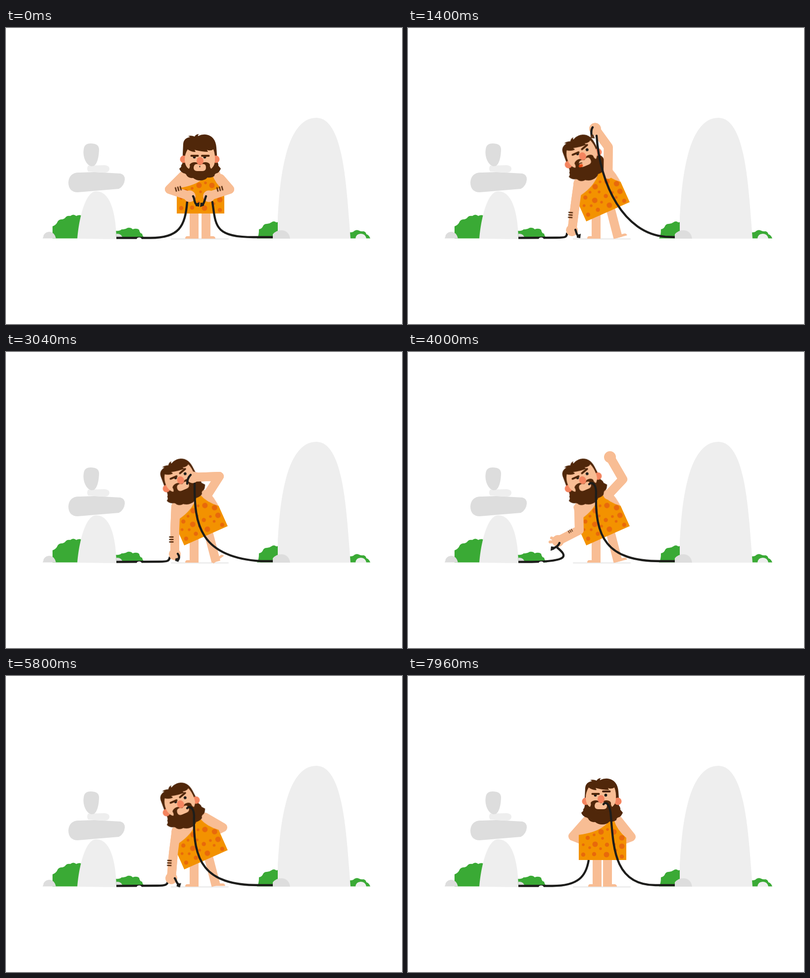
An HTML page without scripts that plays this animation: 800x600 px, repeating every 8 s.

```html
<!DOCTYPE html>
<html lang="en">
<head>
<meta charset="utf-8">
<title>Caveman</title>
<style>
html, body { margin: 0; width: 100%; height: 100%; overflow: hidden; background: #fff; }
svg { display: block; width: 100vw; height: 100vh; }
svg * { animation-duration: 8s; animation-iteration-count: infinite; animation-timing-function: ease-in-out; }
.pale { fill: #eee; }
.grey { fill: #ddd; }
.green { fill: #3aaa35; }
.skin { fill: #f8bd94; }
.red { fill: #f4845f; }
.hair { fill: #50270a; }
.ink { fill: #1d1d1b; }
.limb { fill: none; stroke: #f8bd94; stroke-width: 18; stroke-linecap: round; stroke-linejoin: round; }
.arm { marker-end: url(#hand); }
.cable { fill: none; stroke: #1d1d1b; stroke-width: 4.3; stroke-linecap: round; stroke-linejoin: round; }
.flat { stroke-linecap: butt; }
.brow { stroke: #50270a; stroke-width: 4; stroke-linecap: round; }
.band { fill: none; stroke: #50270a; stroke-width: 2.4; }
.spots { fill: none; stroke: #e8690b; stroke-linecap: round; }

/* Body */
.torso { transform-origin: 393px 373px; animation-name: torso; }
@keyframes torso {
  0%, 2% { transform: translate(0, 3px) rotate(0deg); }
  7%, 74% { transform: translate(11px, -.5px) rotate(-24deg); }
  80%, 100% { transform: translate(0, 0) rotate(0deg); }
}
.legL { animation-name: legL; }
@keyframes legL { 0%, 74% { transform: translate(-2px, 0); } 80%, 100% { transform: translate(0, 0); } }
.legR { transform-origin: 403px 370px; animation-name: legR; }
@keyframes legR {
  0%, 2% { transform: translate(1px, 0) rotate(0deg); }
  7%, 74% { transform: translate(7px, 0) rotate(-14.5deg); }
  80%, 100% { transform: translate(0, 0) rotate(0deg); }
}
.foot { transform-origin: 402px 425px; animation-name: foot; }
@keyframes foot {
  0%, 17% { transform: rotate(0deg); }
  22%, 41% { transform: rotate(-22deg); }
  47%, 51% { transform: rotate(0deg); }
  57%, 74% { transform: rotate(14.5deg); }
  80%, 100% { transform: rotate(0deg); }
}

/* Head */
.head { transform-origin: 392px 254px; animation-name: head; }
@keyframes head {
  0%, 2% { transform: translate(0, 8px) rotate(0deg); }
  7%, 74% { transform: translate(-37.5px, 10px) rotate(-23deg); }
  80%, 100% { transform: translate(0, 0) rotate(0deg); }
}
.ears { animation-name: ears; }
@keyframes ears { 0%, 2% { transform: translate(0, 4px); } 7%, 100% { transform: translate(0, 0); } }
.face { animation-name: face; }
@keyframes face { 0%, 2% { transform: translate(0, 12px); } 7%, 100% { transform: translate(0, 0); } }
.look { animation-name: look; }
@keyframes look { 0%, 92% { transform: translate(0, 0); } 95%, 100% { transform: translate(-2px, 0); } }
.pupils { animation-name: pupils; }
@keyframes pupils {
  0%, 2% { transform: translate(0, 0); }
  7%, 74% { transform: translate(4px, -.5px); }
  80%, 100% { transform: translate(0, 0); }
}
.raise { transform-origin: 403px 239px; animation-name: raise; }
@keyframes raise {
  0%, 2% { transform: translate(0, 0) rotate(0deg); }
  7%, 74% { transform: translate(0, -5px) rotate(-17deg); }
  80%, 92% { transform: translate(0, 0) rotate(0deg); }
  95%, 100% { transform: translate(0, -5px) rotate(0deg); }
}
.tongue { animation-name: tongue; }
@keyframes tongue { 0%, 4% { opacity: 0; } 7%, 17% { opacity: 1; } 20%, 100% { opacity: 0; } }
.lips { animation-name: lips; }
@keyframes lips { 0%, 2% { opacity: 1; } 4%, 100% { opacity: 0; } }

/* Arms */
.left { animation-name: left; }
@keyframes left {
  0%, 2% { d: path("M358 299L330 327L371 341"); }
  7%, 17% { d: path("M344 313L338 355L331 410"); }
  21.5%, 41% { d: path("M343 313L341 360L341 410"); }
  47%, 51% { d: path("M345 314L346 361L303 383"); }
  57%, 74% { d: path("M344 313L338 360L334 410"); }
  80%, 100% { d: path("M362 292L333 325L358 335"); }
}
.right { animation-name: right; }
@keyframes right {
  0%, 2% { d: path("M433 305L452 327L410 341"); }
  7%, 17% { d: path("M404 297L404 241L378 203"); }
  21.5%, 41% { d: path("M408 288L431 252L377 254"); }
  47% { d: path("M404 290L434 257L407 209"); }
  50% { d: path("M404 290L434 258L408 213"); }
  57%, 74% { d: path("M402 286L438 307L412 320"); }
  80%, 100% { d: path("M424 292L451 326L428 335"); }
}
.showL { animation-name: showL; animation-timing-function: step-end; }
@keyframes showL { 0% { opacity: 1; } 77%, 100% { opacity: 0; } }
.showR { animation-name: showR; animation-timing-function: step-end; }
@keyframes showR { 0% { opacity: 1; } 54%, 100% { opacity: 0; } }
.bandL { animation-name: bandL; }
@keyframes bandL {
  0%, 2% { transform: translate(348px, 326px) rotate(75deg) scale(1); }
  7%, 17% { transform: translate(328px, 379px) rotate(5deg) scale(1); }
  21.5%, 41% { transform: translate(334px, 380px) rotate(0deg) scale(1); }
  47%, 51% { transform: translate(328px, 363px) rotate(60deg) scale(.7); }
  57%, 100% { transform: translate(330px, 379px) rotate(3deg) scale(1); }
}
.bandR { animation-name: lips; }
.fingers { stroke-width: 6; animation-name: fingers; }
@keyframes fingers { 0%, 43% { opacity: 0; } 46%, 51% { opacity: 1; } 54%, 100% { opacity: 0; } }

/* Cables and clips */
.wireL { animation-name: wireL; }
@keyframes wireL {
  0%, 2% { d: path("M223 425.5L290 425.5C350 426 362 402 366 352"); }
  7%, 17% { d: path("M223 425.5L300 425C318 425 321 424 321 415"); }
  21.5%, 41% { d: path("M223 425.5L310 425C326 425 330 424 331 415"); }
  47%, 51% { d: path("M223 425.5L250 425.5C330 424 320 412 301 396"); }
  57%, 74% { d: path("M223 425.5L306 425C322 425 326 423 327 417"); }
  80%, 100% { d: path("M223 425.5L290 425.5C345 426 360 405 365 373"); }
}
.wireR { animation-name: wireR; }
@keyframes wireR {
  0%, 2% { d: path("M540 424L500 424C420 424 424 400 417 353C417 353 417 353 417 353"); }
  7%, 17% { d: path("M540 424L520 423C437 416 388 318 381 217C381 217 381 217 381 217"); }
  21.5%, 41% { d: path("M540 424L515 424C392 416 380 350 381 267C381 267 381 267 381 267"); }
  46%, 74% { d: path("M540 424L510 424C400 424 377 375 380 283C379 263 368 264 366 268"); }
  80%, 92% { d: path("M540 424L500 424C418 424 416 350 411 285C409 257 400 255 397 261"); }
  95%, 100% { d: path("M540 424L500 424C418 424 415 350 410 285C408 257 399 254 395 260"); }
}
.clipL { animation-name: clipL; }
@keyframes clipL {
  0%, 2% { d: path("M378 341C381 345 380 353 384 357"); }
  7%, 17% { d: path("M338 409C340 414 340 418 343 421"); }
  21.5%, 41% { d: path("M347 409C351 414 350 418 348 421"); }
  47%, 51% { d: path("M306 387C304 393 299 396 293 398"); }
  57%, 100% { d: path("M341 410C344 414 344 419 348 422"); }
}
.jawL { animation-name: jawL; }
@keyframes jawL {
  0%, 2% { transform: translate(387px, 358px) rotate(0deg); }
  7%, 17% { transform: translate(345px, 422px) rotate(0deg); }
  21.5%, 41% { transform: translate(346px, 421px) rotate(10deg); }
  47%, 51% { transform: translate(292px, 398px) rotate(180deg); }
  57%, 100% { transform: translate(349px, 424px) rotate(10deg); }
}
.clipR { animation-name: clipR; }
@keyframes clipR {
  0%, 2% { d: path("M404 341C402 346 401 353 398 357"); }
  7%, 17% { d: path("M373 200C370 204 370 210 371 216"); }
  21.5%, 100% { d: path("M373 249C368 254 366 260 366 267"); }
}
.jawR { animation-name: jawR; }
@keyframes jawR {
  0%, 2% { transform: translate(396px, 358px) rotate(180deg); opacity: 1; }
  7%, 17% { transform: translate(373px, 217px) rotate(90deg); opacity: 1; fill: #50270a; }
  20%, 100% { transform: translate(366px, 267px) rotate(90deg); opacity: 0; }
}
.showClip { animation-name: showClip; animation-timing-function: step-end; }
@keyframes showClip { 0% { opacity: 1; } 43%, 100% { opacity: 0; } }
</style>
</head>
<body>
<svg viewBox="0 0 800 600">
  <defs>
    <marker id="hand" markerUnits="userSpaceOnUse" markerWidth="24" markerHeight="24" refX="12" refY="12">
      <circle cx="12" cy="12" r="11.8" class="skin"/>
    </marker>
    <path id="jaw" d="M-4 -2L4 -5L3 4L-4 3Z"/>
    <path id="stripes" d="M-4.5 -5h9M-4.5 0h9M-4.5 5h9"/>
  </defs>

  <!-- Left stones -->
  <path class="green" d="M94 426.5V402Q100 400 103 395Q105 389 111 388Q118 388 121 383Q124 380 130 381Q136 376 142 381Q147 378 152 380V426.5Z"/>
  <path class="green" d="M222 426.5V411Q229 412 234 408Q240 409 246 405Q252 404 256 408Q264 405 269 409Q270 416 275 417Q276 423 281 426.5Z"/>
  <path class="grey" d="M74 426.5Q76 423 76 420Q80 413 88 413Q98 414 101 426.5Z"/>
  <path class="grey" d="M223 427V417Q233 416 236 426Z"/>
  <path class="pale" d="M144 427C147 388 160 331 182 331C212 331 222 378 223 428Z"/>
  <path class="grey" d="M126 313C127 299 135 292 150 293L178 292L231 295Q240 297 240 307Q239 320 228 326L145 333C133 333 126 326 126 313Z"/>
  <path class="pale" d="M166 279L200 278Q209 279 209 286Q208 293 200 293L166 291Q162 285 166 279Z"/>
  <path class="grey" d="M157 246Q158 234 171 234Q187 234 188 245C188 260 184 280 175 280C164 282 154 262 157 246Z"/>

  <!-- Right stones -->
  <path class="green" d="M507 426.5Q511 422 511 408Q517 407 519 402Q521 397 527 397Q532 397 536 394Q541 390 546 394L552 393V426.5Z"/>
  <path class="green" d="M694 426.5V414Q700 415 704 411Q709 408 714 411Q718 413 722 412Q727 413 728 418Q733 419 736 426.5Z"/>
  <path class="pale" d="M549 427V385C552 330 560 182 627 182C674 182 684 285 690 350L696 427Z"/>
  <path class="pale" d="M706 427Q707 417 717 417Q726 417 728 427Z"/>
  <rect class="pale" x="333" y="426" width="117" height="3" rx="1.5"/>

  <!-- Legs and the arms held behind -->
  <path class="skin legL" d="M373 365H391V427H364Q364 422 368 422H373Z"/>
  <g class="legR">
    <path class="skin" d="M394 362H412V427H394Z"/>
    <path class="skin foot" d="M396 427V422H418Q422 423 422 427Z"/>
  </g>
  <path class="limb arm left" d="M358 299L330 327L371 341"/>
  <path class="limb arm right" d="M433 305L452 327L410 341"/>

  <g class="torso">
    <path class="skin" d="M353 291Q392 265 432 289Q441 308 441 335H345Z"/>
    <path fill="#f39200" d="M345 373V322Q376 318 392 307Q404 300 408 289L416 292Q422 312 441 328V373Z"/>
    <path class="spots" stroke-width="11" d="M416 316h0M432 328h0M432 345h0M401 362h0M390 316h0M378 341h0"/>
    <path class="spots" stroke-width="8.5" d="M363 328h0M402 342h0M376 361h0M354 362h0M432 366h0"/>
    <path class="spots" stroke-width="5.5" d="M403 311h0M393 329h0M354 342h0M389 350h0M417 341h0M420 353h0M367 348h0M376 322h0"/>
  </g>

  <path class="cable flat wireL" d="M223 425.5L290 425.5C350 426 362 402 366 352"/>
  <ellipse cx="269" cy="428" rx="5" ry="3.5" fill="#fff"/>

  <!-- Left arm in front -->
  <g class="showL">
    <path class="limb arm left" d="M358 299L330 327L371 341"/>
    <path class="limb fingers" d="M290 377L303 382M287 385L303 384"/>
    <use class="band bandL" href="#stripes"/>
    <path class="cable clipL" d="M378 341C381 345 380 353 384 357"/>
    <use class="ink jawL" href="#jaw"/>
  </g>

  <g class="head">
    <path class="hair" d="M357 248L358 227Q359 215 372 213L368 211Q374 209 381 212Q384 207 390 207Q387 209 388 211Q396 207 404 208Q423 211 425 234L426 248V262Q430 268 429 271L434 277Q431 284 427 286Q421 287 421 292Q415 296 407 295Q402 301 392 301Q384 301 378 296Q369 297 365 291Q364 287 358 286Q352 283 350 277Q355 274 354 270Q357 267 357 262Z"/>
    <g class="ears red">
      <circle cx="359" cy="254" r="7.5"/>
      <circle cx="424" cy="254" r="7.5"/>
    </g>
    <g class="face"><g class="look">
      <path class="skin" d="M361 246Q361 236 367 226Q375 232 383 231L381 227Q396 231 408 231L406 227Q413 230 419 226Q423 236 422 250Q421 262 412 267H372Q361 262 361 246Z"/>
      <path class="hair" d="M367 268Q373 263 371 257Q374 252 382 252L392 254L402 252Q410 252 412 257Q411 263 417 268L392 282Z"/>
      <path class="skin" d="M379 263Q380 254 388 256L392 258L396 256Q404 254 404 263Q404 270 397 270H386Q379 270 379 263Z"/>
      <circle class="ink lips" cx="391.5" cy="261" r="1.2"/>
      <g class="tongue">
        <ellipse cx="381" cy="266" rx="4.5" ry="3" fill="#e8430b"/>
        <path d="M377 263Q381 259 386 262" fill="none" stroke="#50270a" stroke-width="2"/>
      </g>
      <g class="pupils ink">
        <circle cx="380.5" cy="241.5" r="2.9"/>
        <circle cx="401.5" cy="241.5" r="2.9"/>
      </g>
      <ellipse class="red" cx="392" cy="249.5" rx="7" ry="8"/>
      <path class="brow" d="M374.5 239H387.5"/>
      <path class="brow raise" d="M396 239H409.5"/>
    </g></g>
  </g>

  <!-- Right arm in front -->
  <g class="showR">
    <path class="limb arm right" d="M433 305L452 327L410 341"/>
    <g class="bandR"><use class="band" href="#stripes" transform="translate(432 326) rotate(-105)"/></g>
  </g>
  <path class="cable wireR" d="M540 424L500 424C420 424 424 400 417 353C417 353 417 353 417 353"/>
  <g class="showClip">
    <path class="cable clipR" d="M404 341C402 346 401 353 398 357"/>
    <use class="ink jawR" href="#jaw"/>
  </g>
  <path class="grey" d="M539 427V418Q546 410 556 410Q571 410 574 427Z"/>
</svg>
</body>
</html>
```
